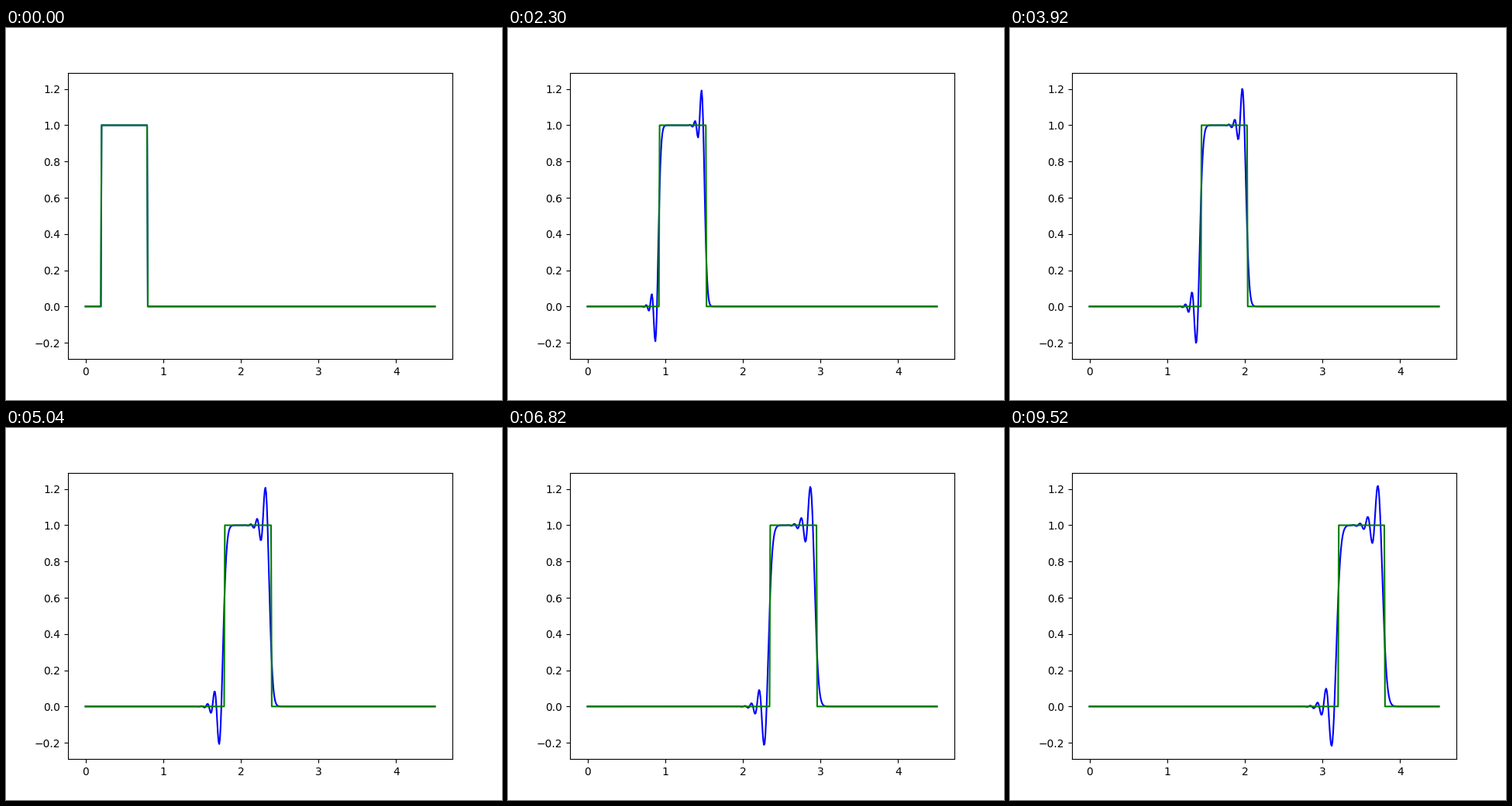
These frames come from a looping animation (640 px wide and 480 px high, 9540 ms). A matplotlib script:

```python
import numpy as np
import matplotlib.pyplot as plt
from matplotlib.animation import FuncAnimation

LENGTH, POINTS = 4.5, 500
SPEED, CFL = 1.0, 0.7
FRAMES, INTERVAL = 477, 20

x = np.linspace(0, LENGTH, POINTS)
dt = CFL * (x[1] - x[0]) / SPEED


def pulse(t):
    """Exact solution: a unit box carried along at constant speed."""
    s = x - SPEED * t
    return np.where((s >= 0.2) & (s <= 0.8), 1.0, 0.0)


def lax_wendroff(u):
    left, mid, right = u[:-2], u[1:-1], u[2:]
    new = u.copy()
    new[1:-1] = (mid - CFL / 2 * (right - left)
                 + CFL**2 / 2 * (right - 2 * mid + left))
    return new


history = [pulse(0)]
for _ in range(FRAMES - 1):
    history.append(lax_wendroff(history[-1]))

low, high = np.min(history), np.max(history)
pad = 0.05 * (high - low)

fig, ax = plt.subplots(figsize=(6.4, 4.8), dpi=100)
numeric, = ax.plot(x, history[0], color="blue")
exact, = ax.plot(x, history[0], color="green")
ax.set_xlim(-0.05 * LENGTH, 1.05 * LENGTH)
ax.set_ylim(low - pad, high + pad)


def update(n):
    numeric.set_ydata(history[n])
    exact.set_ydata(pulse(n * dt))
    return numeric, exact


anim = FuncAnimation(fig, update, frames=FRAMES, interval=INTERVAL,
                     repeat=True, repeat_delay=0)
plt.show()
```
